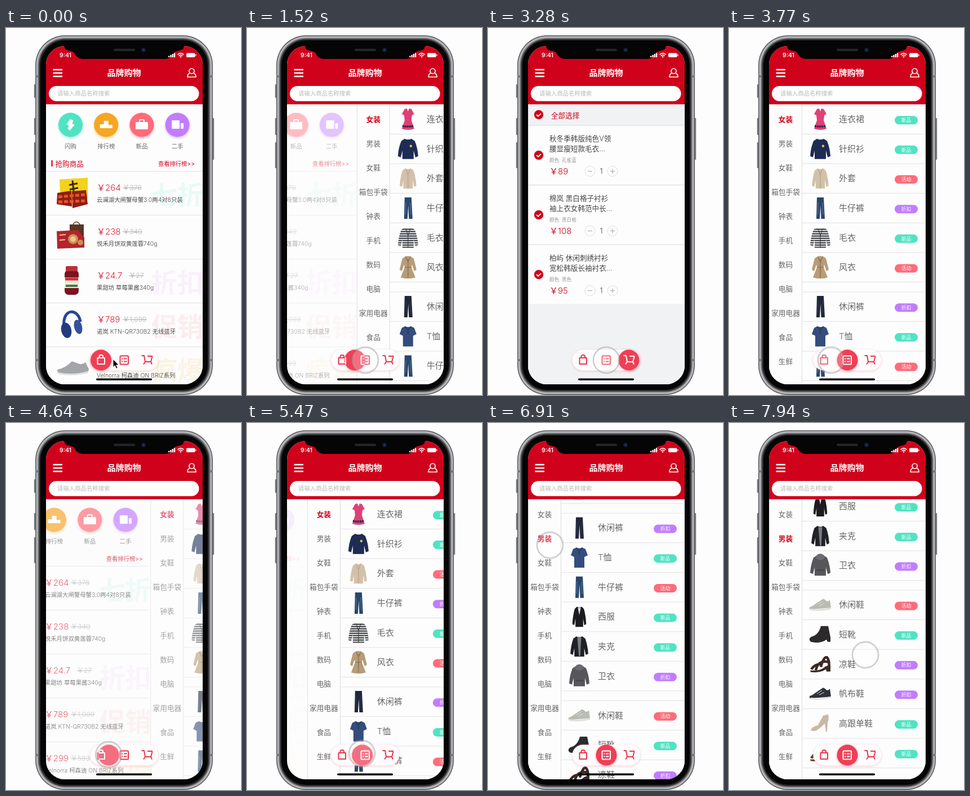
An HTML page that plays this animation: 417 px wide and 652 px high, repeating every 8 s.

```html
<!DOCTYPE html>
<html lang="zh-CN">
<head>
<meta charset="utf-8">
<style>
html, body { margin: 0; width: 100%; height: 100%; overflow: hidden; background: #fdfdfd }
svg { display: block; width: 417px; height: 652px }
text { font-family: Inter, 'Noto Sans CJK SC', 'Noto Sans CJK', sans-serif; font-weight: 300; white-space: pre }
.b { font-weight: 700 }
</style>
</head>
<body>
<svg id="stage" viewBox="0 0 417 652"></svg>
<script>
const RED = '#d0021b', TEAL = '#50e3c2', CORAL = '#ff6b7a', VIOLET = '#c17dff', AMBER = '#f5a623';
const W = 277.5, LOOP = 8000;

// y is the vertical middle of the glyphs
const text = (x, y, size, fill, str, more = '') =>
  `<text x="${x}" y="${y + size * .37}" font-size="${size}" fill="${fill}" ${more}>${str}</text>`;
const rect = (x, y, w, h, fill, r = 0, more = '') =>
  `<rect x="${x}" y="${y}" width="${w}" height="${h}" rx="${r}" fill="${fill}" ${more}/>`;
const circle = (x, y, r, fill, more = '') => `<circle cx="${x}" cy="${y}" r="${r}" fill="${fill}" ${more}/>`;
const path = (d, fill, more = '') => `<path d="${d}" fill="${fill}" ${more}/>`;
const line = (d, color, w = 1, more = '') => path(d, 'none', `stroke="${color}" stroke-width="${w}" ${more}`);
const at = (x, y, inner, more = '') => `<g transform="translate(${x} ${y}) ${more}">${inner}</g>`;
const hline = (x, y, color = '#e2e2e2') => line(`M${x} ${y}H349`, color);

// ---- clothes and shoes, drawn around the origin
const knit = (c, sx = 1, extra = '') => at(0, 0,
  path('M-6-18Q0-15 6-18L12-14Q17-2 18 13L13 15 10 3V18H-10V3L-13 15-18 13Q-17-2-12-14Z', c) + extra, `scale(${sx} 1)`);
const trousers = (c, hi) => path('M-6-19H6L8 19H1.5L.5-5-1 19H-7Z', c) + line('M-4-10L-4.5 12M4-10L5 12', hi, 1.5);
const shoe = (c, sole) => path('M-19 4Q-13 2-7-3L5-11 9-9Q12-4 17-9L19 5-19 8Z', c) + line('M-18 8Q0 11 19 6', sole, 3) + line('M-6 0L3-6M-2 2L7-3', sole, 1);
const sandal = c => line('M-16 9Q-9-1 1 0M-8 11Q-4-8 14-4M1 5Q6-14 12-12 17-6 15 7', c, 4.5) + path('M-18 11Q0 13 9 4L18 1V13H11L10 9Q0 16-17 14Z', c);
const goods = {
  dress: path('M-6-18L-2-19 0-14 2-19 6-18 11-9 7-7 6 2 11 17Q0 21-11 17L-6 2-7-7-11-9Z', '#dd4176') + line('M-10 12Q0 14 10 12', '#25264a', 3.5, 'stroke-dasharray="3 1"'),
  sweater: knit('#1e2c54', 1, circle(5, -5, 2.2, '#e5c34c')),
  cardigan: knit('#d2c1aa', .82, line('M-4-16L0-7V18M4-16L0-7', '#a8957e', 1)),
  jeans: trousers('#29466b', '#4a6b92'),
  stripes: knit('url(#stripe)', 1, line('M-4-16L0-4V18M4-16L0-4', '#333', 1)),
  trench: path('M-4-20H4L10-16 15 4 11 7 7-5 6 0 13 18Q0 22-13 18L-6 0-7-5-11 7-15 4-10-16Z', '#b89c78') + line('M-6 0H6M0-14V18M-4-18L0-10 4-18', '#836a4c', 1.2),
  slacks: trousers('#20273a', '#2c344a'),
  polo: path('M-5-18Q0-15 5-18L11-15 15-4 9-1V18H-9V-1L-15-4-11-15Z', '#354d7c') + line('M-5-17L0-11 5-17M0-11V-4', '#22355c', 1.3),
  blazer: knit('#1c1c1f', .68, path('M-4-16L0-3 4-16Z', '#d8d8da')),
  jacket: knit('#202126', .88, path('M-4-16H4L2 17H-1Z', '#777a80')),
  hoodie: knit('#56565b', 1, path('M-8-13Q-7-21 0-21T8-13Q0-7-8-13Z', '#6a6a70') + line('M-7 8H7', '#434348', 2)),
  runner: shoe('#b9bcb3', '#e0e0da'),
  boot: path('M1-15H14L18 5V13H13L11 9Q0 17-17 13-22 8-16 4-3 1 1-15Z', '#2c2a2b'),
  sandal: sandal('#3a2824'),
  canvas: shoe('#2f3238', '#e8e8e6'),
  heel: path('M-17 12Q-15 6-4 3L5-14 14-16Q16-8 13-2L12 15H10L8 0Q2 7-6 12-12 15-17 12Z', '#c9b8a8'),
  strap: sandal('#5b4030')
};

// ---- home page
const homeIcons = [
  ['闪购', TEAL, path('M-1-10L5-8 3-2 7 0-1 10-5 7-3 2-7-1Z', '#fff')],
  ['排行榜', AMBER, path('M-11-1H-4V-7H4V0H11V6H-11Z', '#fff')],
  ['新品', CORAL, rect(-11, -5, 22, 13, '#fff', 1.5) + rect(-4, -9, 8, 6, 'none', 1, 'stroke="#fff" stroke-width="2"')],
  ['二手', VIOLET, rect(-10, -8, 14, 15, '#fff', 1) + rect(6, -3, 5, 10, '#fff', 1)]
];
const products = [
  ['264', '378', 207, '云澜湖大闸蟹母蟹3.0两4对8只装', '七折', TEAL,
    path('M95 269L145 266V304L97 310Z', '#f3d21c') + line('M118 271L120 290M112 279L127 276M113 287L128 284', '#3a2a12', 3) +
    path('M91 293L116 289 117 317 90 313Z', '#8f1d14') + path('M117 290L142 288 145 313 118 320Z', '#8f1d14') +
    line('M93 300L141 296M93 309L142 307', '#e2562a', 5, 'stroke-dasharray="7 3"')],
  ['238', '340', 207, '悦禾月饼双黄莲蓉740g', '', '',
    rect(113, 349, 25, 36, '#5a3524') + line('M119 349Q125 340 131 349', '#5a3524', 1.5) +
    path('M90 361L127 359 139 372V390L91 392Z', '#b3242b') + circle(119, 375, 9, '#c99155') + circle(119, 375, 5, '#e9c891') +
    circle(132, 381, 5, '#c99155') + line('M95 368L106 367M95 377L105 376', '#e9c891', 2)],
  ['24.7', '27', 218, '果甜坊 草莓果酱340g', '折扣', '#e08cf0',
    rect(104, 430, 25, 44, '#7a1420', 7) + rect(106, 423, 21, 9, '#b9323a', 2) + rect(104, 443, 25, 19, '#f1e6d8') + line('M105 446H128', '#cf3038', 5) + line('M106 458H127', '#3f7d45', 4)],
  ['789', '1,099', 207, '诺岚 KTN-QR730B2 无线蓝牙', '促销', CORAL,
    line('M103 531C99 498 128 496 132 522', '#2a4594', 5) + `<ellipse cx="107" cy="537" rx="9" ry="14" fill="#223a80" transform="rotate(-14 107 537)"/><ellipse cx="128" cy="531" rx="7" ry="13" fill="#34519f" transform="rotate(-14 128 531)"/>`],
  ['299', '593', 207, 'Velnorra 柯森迪 ON BRIZ系列', '疯爆', AMBER,
    path('M91 607Q106 604 117 592L128 596Q134 599 141 594L147 606 145 613Q115 619 92 613Z', '#a3a5a9') + line('M92 613Q118 619 146 611', '#e0e0e0', 3)]
];
const home = rect(71, 135, 278, 500, '#fdfdfd') +
  homeIcons.map(([name, c, icon], i) => {
    const x = 114.5 + 63.2 * i;
    return circle(x, 172, 21.5, c, `style="filter:drop-shadow(0 2px 2px ${c}88)"`) + at(x, 172, icon) +
      text(x, 210, 10.4, '#666', name, 'text-anchor="middle"');
  }).join('') +
  rect(80.5, 235, 2.2, 11, RED) + text(87.5, 241, 12.6, RED, '抢购商品', 'style="font-weight:400"') +
  text(335, 241.5, 10.3, RED, '查看排行榜&gt;&gt;', 'text-anchor="end" style="font-weight:400"') +
  products.map(([price, old, oldX, name, mark, c, art], i) => {
    const y = 254.5 + 78 * i;
    return hline(71, y) + text(258, y + 41, 46, c, mark, 'class="b" opacity=".11"') + art +
      text(161, y + 29, 15, '#dd1c33', '￥' + price) +
      text(oldX, y + 29, 12.2, '#b5b5b5', '￥' + old, 'text-decoration="line-through"') +
      text(161, y + 50.5, 10.4, '#4c4c4c', name);
  }).join('');

// ---- category page
const tags = { 新品: TEAL, 活动: CORAL, 折扣: VIOLET };
const groups = [
  'dress 连衣裙 新品,sweater 针织衫 新品,cardigan 外套 活动,jeans 牛仔裤 折扣,stripes 毛衣 新品,trench 风衣 活动',
  'slacks 休闲裤 折扣,polo T恤 新品,jeans 牛仔裤 活动,blazer 西服 新品,jacket 夹克 新品,hoodie 卫衣 折扣',
  'runner 休闲鞋 活动,boot 短靴 新品,sandal 凉鞋 折扣,canvas 帆布鞋 折扣,heel 高跟单鞋 新品,strap 皮鞋 新品'
];
const list = groups.map((g, n) => {
  const top = 135.7 + n * (52.65 * 6 + 17.2);
  return hline(130, top) + g.split(',').map((item, i) => {
    const [art, name, tag] = item.split(' '), y = top + 26.3 + 52.65 * i;
    return at(162, y, goods[art]) + text(195, y - .5, 15, '#666', name) +
      rect(294, y - 5.8, 41, 15, tags[tag], 7.5) +
      text(314.5, y + 1.7, 8.7, '#fff', tag, 'text-anchor="middle" style="font-weight:400"') + hline(130, y + 26.3);
  }).join('');
}).join('');
const sections = '女装 男装 女鞋 箱包手袋 钟表 手机 数码 电脑 家用电器 食品 生鲜'.split(' ');
const category = rect(71, 135, 278, 500, '#fdfdfd') +
  `<g clip-path="url(#listClip)"><g id="list">${list}</g></g>` +
  line('M71.5 135V635M129.5 135V635', '#dcdcdc') +
  sections.map((s, i) => text(100.5, 162 + 43 * i, 12.7, '#666', s, `text-anchor="middle" id="s${i}"`)).join('');

// ---- cart page
const check = (x, y) => circle(x, y, 8.2, RED) + line(`M${x - 3.8} ${y}l2.8 2.8 5-5`, '#fff', 1.8);
const cartItems = [
  ['秋冬季韩版纯色V领', '腰显瘦短款毛衣…', '孔雀蓝', 89],
  ['棉岚 黑白格子衬衫', '袖上衣女韩范中长…', '黑白格', 108],
  ['柏屿 休闲刺绣衬衫', '宽松韩版长袖衬衣…', '黑色', 95]
];
const cart = rect(71, 135, 278, 500, '#f1f2f4') + check(90, 154) + text(112, 155, 12.6, RED, '全部选择') +
  cartItems.map(([a, b, color, price], i) => {
    const y = 173 + 106 * i;
    return rect(71, y, 278, 105, '#fdfdfd') + hline(71, y, '#dadbdd') + check(90, y + 53) +
      text(109, y + 23, 12.6, '#444', a) + text(109, y + 41, 12.6, '#444', b) +
      text(109, y + 61.5, 8.6, '#999', '颜色: ' + color) + text(109, y + 81.5, 15, RED, '￥' + price) +
      [181, 221].map((x, n) => circle(x, y + 81.5, 9, '#fdfdfd', 'stroke="#ddd"') +
        line(`M${x - 4} ${y + 81.5}h8` + (n ? `m-4-4v8` : ''), '#bbb', 1.5)).join('') +
      text(201, y + 81.5, 13, '#444', '1', 'text-anchor="middle"');
  }).join('') + line('M71.5 135V635', '#dcdcdc');

// ---- fixed parts
const status = text(95, 48.5, 10.4, '#fff', '9:41', 'style="font-weight:600"') +
  [0, 1, 2, 3].map(i => rect(288 + 3.3 * i, 49.5 - 1.7 * i, 2.3, 2.5 + 1.7 * i, '#fff', .5)).join('') +
  line('M304.5 47.3Q310 42.4 315.5 47.3M306.6 49.6Q310 46.6 313.4 49.6', '#fff', 1.7) + circle(310, 51.3, 1.2, '#fff') +
  rect(320, 44.5, 15.5, 7.5, '#fff', 1.8) + rect(336.3, 46.8, 1.2, 3, '#fff', .5);
const header = rect(71, 32, 278, 103.5, RED) +
  line('M83.5 74H100M83.5 80H100M83.5 86H100', '#fff', 2.7) +
  text(209.5, 79, 15, '#fff', '品牌购物', 'text-anchor="middle" class="b"') +
  circle(329.5, 76.5, 4.5, 'none', 'stroke="#fff" stroke-width="1.7"') +
  line('M326 80Q322 82 322 87H337Q337 82 333 80', '#fff', 1.7, 'stroke-linejoin="round"') +
  rect(76, 103, 266.5, 27, '#fff', 13.5) + text(91, 116.5, 10.4, '#b9b9b9', '请输入商品名称搜索');

const icons = '<g id="icons" fill="none" stroke="currentColor" stroke-width="2" stroke-linejoin="round">' +
  '<path d="M162.5 586H175V597H162.5ZM165.5 586V583.5Q165.5 581 168.7 581T172 583.5V586"/>' +
  '<rect x="202.5" y="582.5" width="14.5" height="15" rx="1.5"/><path d="M205.3 587.5h2M209 587.5h5.5M205.3 592.5h2M209 592.5h5.5"/>' +
  '<path d="M240.5 582H245L247 593H257L259.5 584M247 593L244 597.5M257 593L259 597.5M251 583H260"/></g>';
const nav = rect(149.5, 571.5, 120.5, 37, '#fff', 18.5, 'fill-opacity=".96" style="filter:drop-shadow(0 1px 2px rgba(235,90,105,.35))"') +
  '<use href="#icons" color="#e5364b"/>' +
  circle(168.5, 590, 18.5, '#ee3f55', 'id="dot" style="filter:drop-shadow(0 1px 2px rgba(238,63,85,.5))"') +
  '<g clip-path="url(#dotClip)"><use href="#icons" color="#fff"/></g>' + rect(160, 622.5, 99, 3.6, '#000', 1.8);

const shell = (inset, fill) => rect(52 + inset, 13 + inset, 315 - 2 * inset, 639 - 2 * inset, fill, 53 - inset);
const phone = [[100, 24], [160, 30], [203, 46]].map(([y, h]) => rect(49.8, y, 3, h, '#77787a', 1)).join('') +
  rect(366.2, 160, 3, 74, '#77787a', 1) +
  shell(0, '#58585a') + shell(1.5, '#b6b7ba') + shell(4.5, '#77787b') + shell(6.5, '#2e2e30') + shell(9, '#050505') +
  [52, 362].map(x => rect(x, 84, 5, 4, '#77787a') + rect(x, 588, 5, 4, '#77787a')).join('');
const notch = path('M100 31Q104 32 104 35C105 41 118 40 121 44Q126 55 136 55H283Q293 55 298 44C301 40 314 41 315 35Q315 32 319 31Z', '#050505') +
  rect(191, 36.8, 38, 4.2, '#252527', 2.1) + circle(244, 39, 4, '#141a2c') + circle(244, 39, 1.8, '#26366a');

const stage = document.getElementById('stage');
stage.innerHTML = `<defs>
  <clipPath id="screen"><rect x="71" y="32" width="278" height="601" rx="33"/></clipPath>
  <clipPath id="body"><rect x="71" y="135.5" width="278" height="500"/></clipPath>
  <clipPath id="listClip"><rect x="130" y="135" width="219" height="500"/></clipPath>
  <clipPath id="dotClip"><circle id="dotHole" cx="168.5" cy="590" r="18.5"/></clipPath>
  <pattern id="stripe" width="4" height="4" patternUnits="userSpaceOnUse"><path d="M0 0H4V4H0Z" fill="#f1f1f1"/><path d="M0 0H4V2H0Z" fill="#2b2d36"/></pattern>
  ${icons}</defs>${phone}
  <g clip-path="url(#screen)">${rect(71, 32, 278, 601, '#fdfdfd')}
    <g clip-path="url(#body)"><g id="home">${home}</g><g id="category">${category}</g><g id="cart">${cart}</g></g>
    ${header}${nav}</g>${notch}${status}
  <path id="arrow" d="M0 0V14L3.2 11 5.6 16.6 8 15.6 5.7 10.3H10.2Z" stroke="#fff" stroke-width=".9"/>
  <circle id="ring" r="23" fill="#fff" fill-opacity=".25" stroke="#999" stroke-opacity=".45" stroke-width="2.8"/>`;
const el = id => document.getElementById(id);
const move = (id, x, y = 0) => el(id).setAttribute('transform', `translate(${x} ${y})`);

// ---- motion
const clamp = v => Math.max(0, Math.min(1, v));
const ease = (t, start, span = 360) => { const u = clamp((t - start) / span); return u * u * (3 - 2 * u); };
// moves of the touch point: start, duration, dx, dy
const touch = [
  [2200, 200, 34, 0], [2760, 200, -34, 0], [3550, 300, -35, 0], [4560, 250, 29, -3],
  [5560, 400, -46, -293], [6000, 440, -48, -77], [7420, 260, 132, 195]
];

function draw(t) {
  const page = ease(t, 1328) + ease(t, 2419) - ease(t, 3300) - ease(t, 4420) + ease(t, 5192);
  move('home', -W * page);
  move('category', W * (1 - page));
  move('cart', W * (2 - page));
  el('home').setAttribute('opacity', clamp(1 - page));
  el('category').setAttribute('opacity', clamp(page * 1.8));
  move('list', 0, -316 * ease(t, 6620, 320) - 189 * ease(t, 7620, 320));

  const dotX = page < 1 ? 168.5 + 41.5 * page : 210 + 40 * (page - 1);
  el('dot').setAttribute('cx', dotX);
  el('dotHole').setAttribute('cx', dotX);

  const chosen = t < 6700 ? 0 : 1;
  [0, 1].forEach(i => {
    el('s' + i).setAttribute('fill', i === chosen ? RED : '#666');
    el('s' + i).setAttribute('class', i === chosen ? 'b' : '');
  });

  const touching = t >= 1330;
  el('arrow').style.display = touching ? 'none' : '';
  el('ring').style.display = touching ? '' : 'none';
  move('arrow', 190 - 14 * ease(t, 20, 350) + 34 * ease(t, 640, 540), 588.5);
  let x = 210, y = 590;
  for (const [start, span, dx, dy] of touch) {
    const k = ease(t, start, span);
    x += dx * k;
    y += dy * k;
  }
  move('ring', x, y);
}

function tick() {
  draw(performance.now() % LOOP);
  requestAnimationFrame(tick);
}
tick();
</script>
</body>
</html>
```
